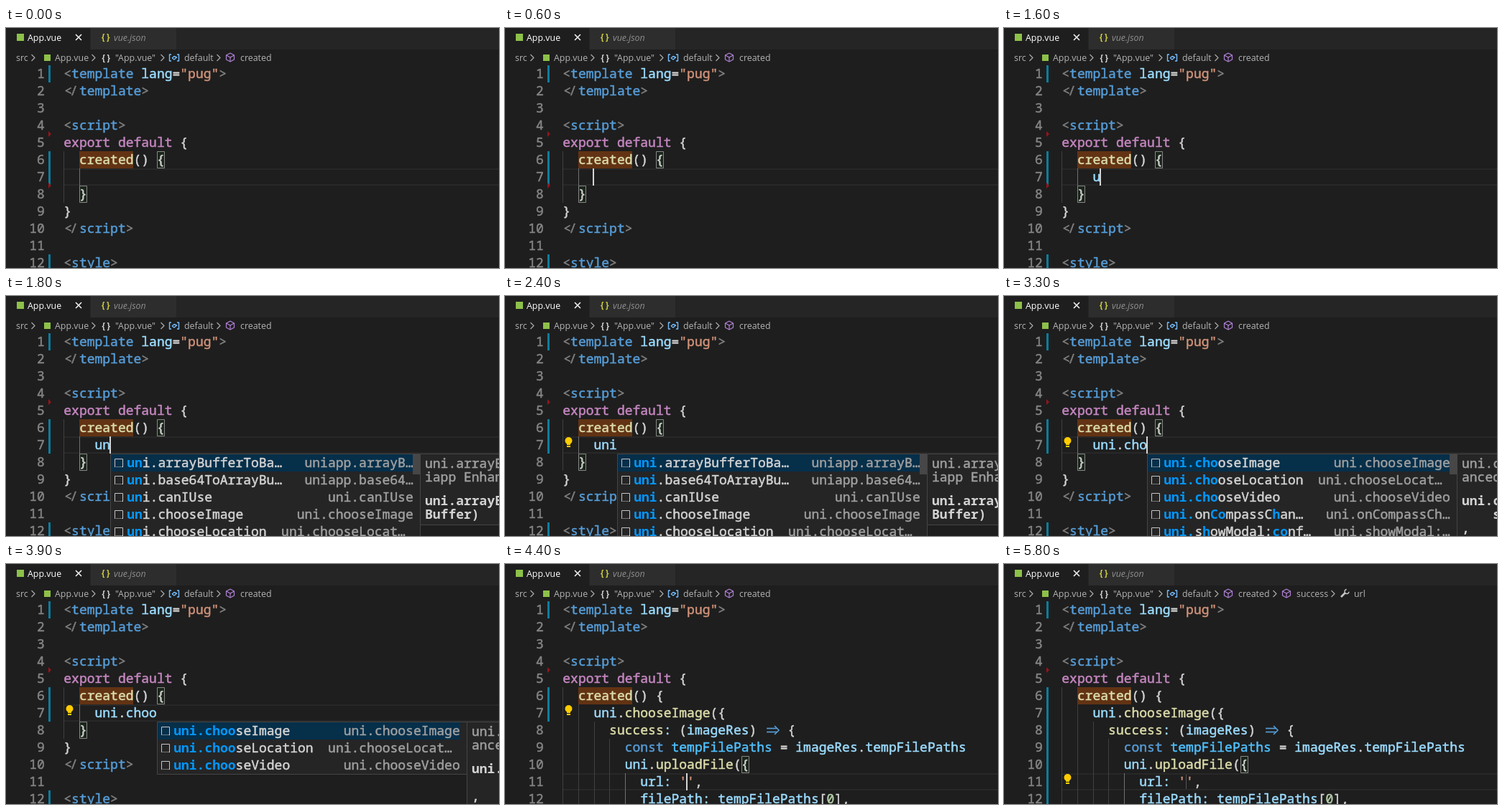
These frames come from a looping animation (686x335 px, 6.1 s). An HTML page with a canvas:

```html
<!DOCTYPE html>
<html lang="en">
<head>
<meta charset="utf-8">
<title>Editor autocompletion</title>
<style>
html, body { margin: 0; width: 100%; height: 100%; overflow: hidden; background: #1e1e1e; }
canvas { display: block; }
</style>
</head>
<body>
<canvas id="stage" width="686" height="335"></canvas>
<script>
const W = 686, H = 335, LOOP = 6100;
const ctx = document.getElementById('stage').getContext('2d');
const LEFT = 80.3, ADV = 10.8, ROW = 24, TOP = 52;
const MONO = '18px "Noto Sans Mono", monospace';
const BOLD = '700 18px "Noto Sans Mono", monospace';
const UI = '12.4px "Open Sans", sans-serif';

const COLORS = {
  g: '#808080', t: '#569cd6', a: '#9cdcfe', w: '#d4d4d4', s: '#ce9178',
  k: '#c586c0', f: '#dcdcaa', c: '#4fc1ff', n: '#b5cea8'
};

// Each token starts with its colour key; tokens are parted by "~".
const HEAD = [
  'g<~ttemplate~a lang~w=~s"pug"~g>',
  'g</~ttemplate~g>',
  '',
  'g<~tscript~g>',
  'kexport default~w {',
  'f  created~w() {'
];
const TAIL = ['w  }', 'w}', 'g</~tscript~g>', '', 'g<~tstyle~g>'];
const SNIPPET = [
  'a    uni~w.~fchooseImage~w({',
  'f      success~a:~w (~aimageRes~w) ~t=>~w {',
  't        const~c tempFilePaths~w = ~aimageRes~w.~atempFilePaths',
  'a        uni~w.~fuploadFile~w({',
  "a          url:~s ''~w,",
  'a          filePath: tempFilePaths~w[~n0~w],'
];

const TYPING = [[1600, 'u'], [1800, 'un'], [2000, 'uni'], [2700, 'uni.'], [2900, 'uni.c'],
  [3100, 'uni.ch'], [3300, 'uni.cho'], [3500, 'uni.choo']];
const BLINKS = [600, 1100, 1600, 2400, 2700, 3900, 4400, 4800, 5300, 5800];
const POPUP = 1700, INSERT = 4400, CRUMBS = 4600, GUTTER = 4700;

// label, detail, and the letters to mark when they differ from the typed text
const same = name => ['uni.' + name, 'uni.' + name];
const image = same('chooseImage'), video = same('chooseVideo'), canUse = same('canIUse');
const place = ['uni.chooseLocation', 'uni.chooseLocat… '];
const LISTS = {
  all: [['uni.arrayBufferToBa…', 'uniapp.arrayB…'], ['uni.base64ToArrayBu…', 'uniapp.base64…'],
    canUse, image, place],
  c: [canUse, image, place, video, same('clearStorage')],
  ch: [image, place, video, ['uni.onCompassChan…', 'uni.onCompassCh…', 'uni.Coh'],
    ['uni.showModal:conf…', 'uni.showModal:…', 'uni.hco']],
  choo: [image, place, video]
};
const DOCS = {
  all: ['uni.arrayBuf', 'iapp Enhanced)', 'uni.arrayBuf', 'Buffer)'],
  c: ['uni.canIUse', 'd)', 'uni.canIUse'],
  ch: ['uni.chooseImage', 'anced)', 'uni.chooseImage', '    success', ',']
};

const colX = col => LEFT + col * ADV;
const caretX = col => Math.floor(colX(col) - .8);
const lineY = n => TOP + (n - 1) * ROW;

function box(x, y, w, h, color) {
  ctx.fillStyle = color;
  ctx.fillRect(x, y, w, h);
}

function frame(x, y, w, h, color) {
  ctx.strokeStyle = color;
  ctx.lineWidth = 1;
  ctx.strokeRect(x + .5, y + .5, w - 1, h - 1);
}

// Code text gets a thin outline for a medium weight.
function text(str, x, y, color, font = MONO) {
  ctx.font = font;
  ctx.fillStyle = color;
  ctx.fillText(str, x, y);
  if (font !== MONO) return;
  ctx.strokeStyle = color;
  ctx.lineWidth = .5;
  ctx.lineJoin = 'round';
  ctx.strokeText(str, x, y);
}

function path(points, color, width = 1, fill = false) {
  ctx.beginPath();
  points.forEach(([x, y], i) => i ? ctx.lineTo(x, y) : ctx.moveTo(x, y));
  if (fill) {
    ctx.fillStyle = color;
    ctx.fill();
  } else {
    ctx.strokeStyle = color;
    ctx.lineWidth = width;
    ctx.stroke();
  }
}

function disc(x, y, r, color) {
  ctx.fillStyle = color;
  ctx.beginPath();
  ctx.arc(x, y, r, 0, 7);
  ctx.fill();
}

function arrow(x, y) {
  for (const s of [-1, 1]) path([[x + 3, y + 2.5 * s], [x + 17, y + 2.5 * s]], COLORS.t, 1.7);
  path([[x + 14, y - 6], [x + 20, y], [x + 14, y + 6]], COLORS.t, 1.7);
}

function codeLine(source, n) {
  let col = 0;
  const y = lineY(n) + 18;
  if (!source) return;
  for (const token of source.split('~')) {
    const str = token.slice(1), color = COLORS[token[0]], x = colX(col);
    if (str === '</') {
      text('<', x + 1, y, color);
      text('/', x + ADV - 2, y, color);
    } else if (str === '=>') {
      arrow(x, y - 6);
    } else {
      text(str, x, y, color);
    }
    col += str.length;
  }
}

function chevron(x) {
  path([[x - 2.5, 37], [x + 2, 41.5], [x - 2.5, 46]], '#a9a9a9', 1.2);
}

function cube(x) {
  const c = '#b180d7', y = 41;
  path([[x, y - 6], [x + 5.5, y - 3], [x + 5.5, y + 3], [x, y + 6], [x - 5.5, y + 3],
    [x - 5.5, y - 3], [x, y - 6]], c, 1.2);
  path([[x - 5.5, y - 3], [x, y], [x + 5.5, y - 3]], c, 1.2);
  path([[x, y], [x, y + 6]], c, 1.2);
}

function wrench(x) {
  path([[x - 5, 46], [x + 1, 40]], '#c5c5c5', 2.6);
  ctx.beginPath();
  ctx.arc(x + 3, 38.5, 3, .1, 4.6);
  ctx.lineWidth = 1.4;
  ctx.stroke();
}

function header(nested) {
  const crumb = (str, x) => text(str, x, 46, '#b4b4b4', UI);
  box(0, 0, W, 30, '#252526');
  box(0, 0, 117, 30, '#1e1e1e');
  box(118, 0, 119, 30, '#2d2d2d');
  box(15, 8, 10, 10, '#8dc149');
  text('App.vue', 30, 18, '#ffffff', UI);
  path([[97, 9], [105, 17]], '#ffffff', 1.4);
  path([[105, 9], [97, 17]], '#ffffff', 1.4);
  text('{}', 131.5, 17, '#cbcb41', '700 12px "Noto Sans Mono", monospace');
  text('vue.json', 150, 18, '#8f8f8f', 'italic ' + UI);

  crumb('src', 14);
  box(53, 37, 9, 9, '#8dc149');
  crumb('App.vue', 68);
  text('{}', 132, 45.5, '#d0d0d0', '700 12px "Noto Sans Mono", monospace');
  crumb('"App.vue"', 152);
  const blue = '#75beff';
  path([[230, 37], [227.5, 37], [227.5, 46], [230, 46]], blue, 1.4);
  path([[238, 37], [240.5, 37], [240.5, 46], [238, 46]], blue, 1.4);
  path([[231, 42], [234, 39.5], [237.5, 41], [234, 44], [231, 42]], blue, 1.4);
  crumb('default', 248);
  cube(312);
  crumb('created', 326);
  [38, 122, 218, 296].forEach(chevron);
  if (nested) {
    chevron(377);
    cube(393);
    crumb('success', 407);
    chevron(458);
    wrench(474);
    crumb('url', 487);
  }
}

function gutter(t) {
  const bar = (from, to) => box(59, lineY(from), 3, (to - from + 1) * ROW, '#0c7d9d');
  const gone = n => path([[59, lineY(n) - 4], [63, lineY(n)], [59, lineY(n) + 4]], '#94151b', 1, true);
  bar(1, 1);
  bar(6, t < GUTTER ? 7 : 12);
  if (t < INSERT) bar(12, 12);
  gone(5);
  if (t < POPUP) gone(8);
  ctx.textAlign = 'right';
  for (let n = 1; n <= 12; n++) text(n, 53.8, lineY(n) + 18, '#858585');
  ctx.textAlign = 'left';
}

function guide(col, from, to, active) {
  box(Math.round(colX(col)), lineY(from), 1, (to - from + 1) * ROW, active ? '#707070' : '#404040');
}

function bracket(col, n) {
  const x = Math.round(colX(col));
  box(x, lineY(n), 11, ROW, 'rgba(0,100,0,.1)');
  frame(x, lineY(n), 11, ROW, '#888888');
}

function bulb(n) {
  const y = lineY(n);
  disc(88.5, y + 6, 5, '#ffcc00');
  box(86, y + 9, 5, 3, '#ffcc00');
  box(86, y + 13, 5, 2, '#ffcc00');
}

function option([label, detail, marks], query, x, y) {
  const icon = '#c5c5c5';
  path([[x + 6.5, y + 18], [x + 6.5, y + 6.5], [x + 17.5, y + 6.5], [x + 17.5, y + 18]], icon);
  for (let i = 0; i < 6; i++) box(x + 6 + 2 * i, y + 17, 1, 1, icon);
  const letters = marks || query;
  let hit = 0;
  [...label].forEach((ch, i) => {
    const on = ch === letters[hit];
    if (on) hit++;
    text(ch, x + 23.2 + i * ADV, y + 18, on ? '#0097fb' : '#d4d4d4', on ? BOLD : MONO);
  });
  text(detail, x + 421.7 - detail.length * ADV, y + 18, '#a0a0a0');
}

function docs(lines, x) {
  const bottom = 301 + 19 * (lines.length - 3);
  box(x, 220, W, bottom - 220, '#252526');
  frame(x, 220, W, bottom - 220, '#454545');
  lines.forEach((line, i) => {
    if (i < 2) text(line, x + 7, 240 + 18.5 * i, '#a0a0a0');
    else text(line, x + 7, 292 + 19 * (i - 2), '#d4d4d4', BOLD);
  });
}

function popup(query) {
  const x = caretX(4 + query.length) + 1, n = query.length;
  const key = n < 5 ? 'all' : n < 6 ? 'c' : n < 8 ? 'ch' : 'choo';
  const rows = LISTS[key], h = rows.length * ROW + 2;
  box(x, 220, 432, h, '#252526');
  frame(x, 220, 432, h, '#454545');
  box(x + 1, 221, 421, ROW, '#062f4a');
  rows.forEach((row, i) => option(row, query, x, 221 + i * ROW));
  if (rows.length > 3) box(x + 421, 221, 10, 28, '#474748');
  docs(DOCS[key] || DOCS.ch, x + 431);
}

function draw(t) {
  const inserted = t >= INSERT;
  const query = TYPING.reduce((last, [at, str]) => t >= at ? str : last, '');
  const caretLine = inserted ? 11 : 7, caretCol = inserted ? 16 : 4 + query.length;

  box(0, 0, W, H, '#1e1e1e');
  header(t >= CRUMBS);
  gutter(t);
  for (const dy of [0, 22]) box(80, lineY(caretLine) + dy, W, 2, '#282828');
  box(102, lineY(6), 75, ROW, '#623314');

  if (inserted) {
    guide(0, 6, 12);
    guide(2, 7, 12);
    guide(4, 8, 12);
    guide(6, 9, 12);
    guide(8, 11, 12, true);
    bracket(23, 10);
  } else {
    guide(0, 6, 8);
    guide(2, 7, 7, true);
    bracket(12, 6);
    bracket(2, 8);
  }

  const typed = query && 'a    ' + query.replace('.', '~w.~a');
  const lines = HEAD.concat(inserted ? SNIPPET : [typed, ...TAIL]);
  lines.forEach((line, i) => codeLine(line, i + 1));
  if (inserted) box(253, lineY(11) + 2, 1, 20, '#555555');
  if (t >= 2200) bulb(t < CRUMBS ? 7 : 11);
  if (t >= POPUP && !inserted) popup(query);
  if (BLINKS.filter(at => t >= at).length % 2)
    box(caretX(caretCol), lineY(caretLine), 2, ROW, '#d4d4d4');
}

const start = performance.now();
function tick() {
  draw((performance.now() - start) % LOOP);
  requestAnimationFrame(tick);
}
tick();
</script>
</body>
</html>
```
